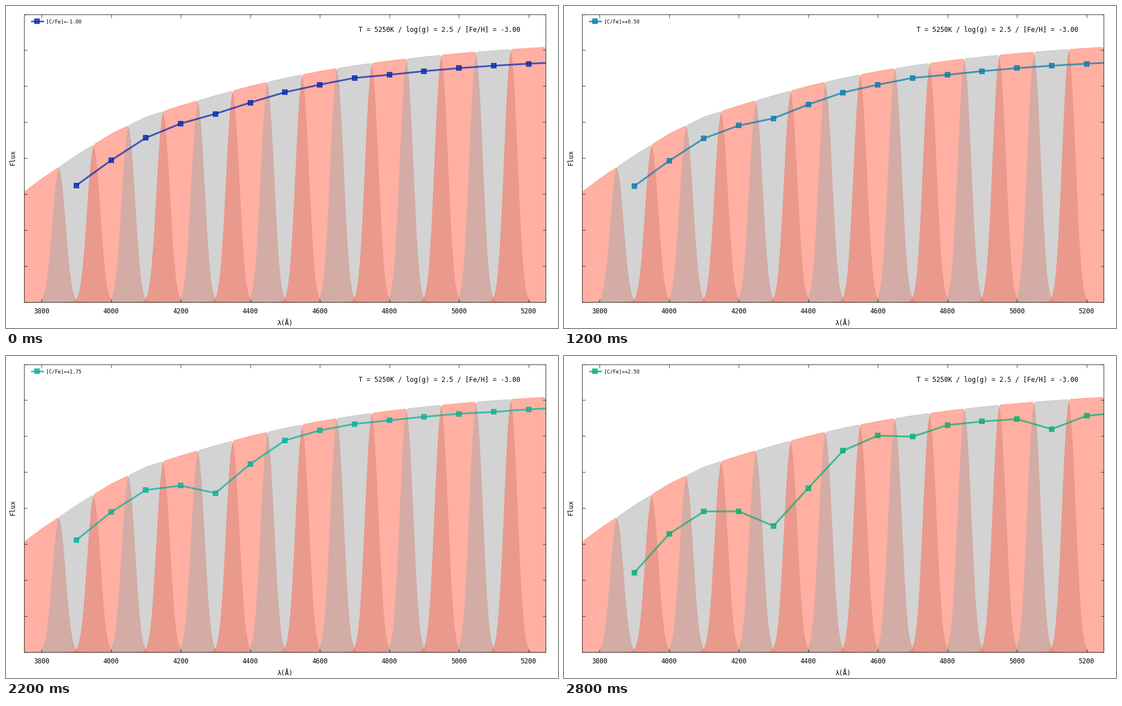
Animation, 980 px wide and 572 px high, one loop 3000 ms. Source, as a matplotlib script:

```python
import colorsys

import matplotlib.pyplot as plt
import numpy as np
from matplotlib.animation import FuncAnimation

W, H, DPI = 980, 572, 100
LEFT, RIGHT, TOP, BOTTOM = 32.4, 958.4, 14.6, 525.6
W_MIN, W_MAX = 3750, 5250
STEPS = 15
PX = 72 / DPI  # points per pixel
BANDS = np.arange(3900, 5301, 100)

plt.rcParams["font.family"] = "DejaVu Sans Mono"


def bell(x, centre, width):
    return np.exp(-0.5 * ((x - centre) / width) ** 2)


def sigmoid(x):
    return 1 / (1 + np.exp(-x))


def continuum(x):
    """Height of the filter tops above the axis, in pixels."""
    return 473.6 - 254.1 * np.exp((3800 - x) / 575.5) + 7 * bell(x, 4070, 90)


def transmission(x, centre):
    """Flat top with steep, soft-footed sides."""
    d = np.maximum(np.abs(x - centre + 1.5) - 45.6, 0)
    return np.exp(-0.693 * (d / 25.4) ** 2.35)


def band_flux(x, step):
    """Height of the stellar curve once the carbon bands have been taken out."""
    base = (438.2 - 231.1 * np.exp((3900 - x) / 476.6) + 5.5 * bell(x, 4120, 60)
            - 5 * bell(x, 4340, 60) + 3 * bell(x, 4680, 50))
    growth = np.exp(0.5 * (step - 14))
    blue = sigmoid((4475 - x) / 35)
    ch = 78 * sigmoid(0.56 * (step - 10)) * bell(x, 4300, 72)
    cn = growth * (50 * blue + 28 * bell(x, 3880, 50))
    c2 = growth ** 2 * (10 * (1 - blue) + 15 * bell(x, 4700, 30) + 24 * bell(x, 5110, 45))
    lift = 9.5 * sigmoid(2 * (step - 10))
    return base + lift - ch - cn - c2


def to_wave(px):
    return W_MIN + (px - LEFT) / (RIGHT - LEFT) * (W_MAX - W_MIN)


def to_px(wave):
    return LEFT + (wave - W_MIN) / (W_MAX - W_MIN) * (RIGHT - LEFT)


fig = plt.figure(figsize=(W / DPI, H / DPI), dpi=DPI, facecolor="white")
ax = fig.add_axes([LEFT / W, 1 - BOTTOM / H, (RIGHT - LEFT) / W, (BOTTOM - TOP) / H])
ax.set_xlim(W_MIN, W_MAX)
ax.set_ylim(0, BOTTOM - TOP)
ax.set_xticks(range(3800, 5201, 200))
ax.set_yticks(np.linspace(0, BOTTOM - TOP, 9))
ax.tick_params(direction="in", top=True, right=True, length=5.5 * PX, width=0.5,
               labelbottom=False, labelleft=False)
for spine in ax.spines.values():
    spine.set_linewidth(0.55)


def label(x, y, text, px=11.6, **kw):
    """Text placed in stage pixels, y downwards."""
    kw = {"ha": "center", "va": "center_baseline", **kw}
    return fig.text(x / W, 1 - y / H, text, fontsize=px * PX, color="black", **kw)


nodes = np.r_[W_MIN, np.arange(3800, 5201, 100), W_MAX]
wave = np.linspace(W_MIN, W_MAX, 1501)
height = np.interp(wave, nodes, continuum(nodes))
for i, centre in enumerate(range(3800, 5201, 100)):
    near = np.abs(wave - centre) <= 135
    x = wave[near]
    ax.fill_between(x, 0, height[near] * transmission(x, centre),
                    color=("tomato", "darkgray")[i % 2], alpha=0.5, lw=0.5)

for tick in range(3800, 5201, 200):
    label(to_px(tick), 541, str(tick))
label(495.5, 562, "λ(Å)")
label(12, 269, "Flux", rotation=90, va="center")
label(913, 41, "T = 5250K / log(g) = 2.5 / [Fe/H] = -3.00", ha="right")
legend = label(71, 27, "", px=8.75, ha="left")

square = dict(marker="s", ms=8 * PX, mew=2 * PX, alpha=0.7, zorder=3)
stroke = dict(lw=3.1 * PX, alpha=0.7, zorder=3)
key_y = BOTTOM - 27
curve, = ax.plot(BANDS, band_flux(BANDS, 0), **{**square, **stroke})
key, = ax.plot(to_wave(np.array([44.5, 66.5])), [key_y] * 2,
               solid_capstyle="butt", **stroke)
key_mark, = ax.plot([to_wave(55.3)], [key_y], ls="none", **square)


def update(step):
    curve.set_ydata(band_flux(BANDS, step))
    colour = colorsys.hsv_to_rgb((228 - 5 * step) / 360, 1, 0.69)
    for artist in (curve, key, key_mark):
        artist.set_color(colour)
    legend.set_text(f"[C/Fe]={-1 + 0.25 * step:+.2f}")
    return curve, key, key_mark, legend


anim = FuncAnimation(fig, update, frames=STEPS, interval=200, repeat=True,
                     repeat_delay=0, blit=False)
plt.show()
```
